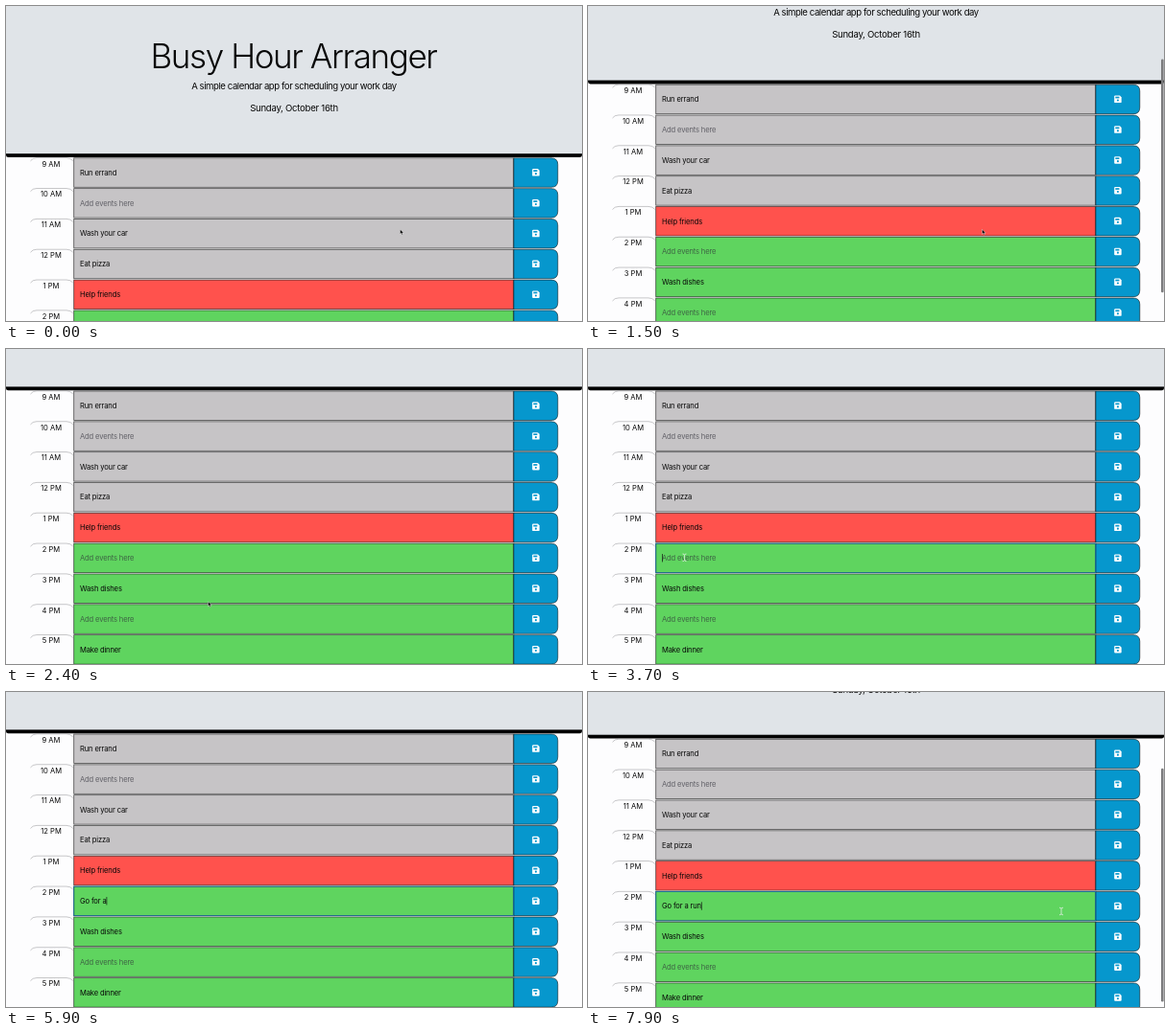
Recreate the animation shown at these times as an HTML page. Size 600 px wide and 329 px high, loop 8000 ms.

```html
<!DOCTYPE html>
<html lang="en">
<head>
<meta charset="utf-8">
<title>Day planner</title>
<style>
  html, body { margin: 0; width: 100%; height: 100%; overflow: hidden; background: #fdfdfe; }
  svg { display: block; width: 600px; height: 329px; }
  text { font: 7.6px Inter, "Open Sans", sans-serif; letter-spacing: -.02em; fill: #080808; white-space: pre; }
  .mid { text-anchor: middle; }
  .title { font-size: 35px; font-weight: 300; letter-spacing: -.04em; }
  .lead { font-size: 9.6px; letter-spacing: -.046em; }
  .date { letter-spacing: -.028em; }
  .hour { letter-spacing: 0; }
  .hint { fill: rgba(45, 45, 55, .66); }
  .edge { stroke: #000; stroke-opacity: .66; stroke-width: .8; }
</style>
</head>
<body>
<svg viewBox="0 0 600 329">
  <g id="page">
    <rect y="-20" width="600" height="178.1" rx="2.4"/>
    <rect y="-20" width="600" height="174.2" fill="#e0e4e8"/>
    <text class="mid title" x="299.5" y="64.5">Busy Hour Arranger</text>
    <text class="mid lead" x="300" y="87">A simple calendar app for scheduling your work day</text>
    <text class="mid lead date" x="300" y="110">Sunday, October 16th</text>
    <g id="rows"></g>
    <rect id="ring" x="70.7" width="458" height="30.5" fill="none" stroke="#1b6f9c" stroke-width=".9"/>
    <rect id="caret" width=".7" height="8.4" fill="#111"/>
  </g>
  <rect id="thumb" x="597" width="2.6" rx="1.3" fill="#7c7c7e"/>
  <path id="arrow" d="M0 0V5L1.2 4 2 5.6 2.9 5.2 2.1 3.7H3.7Z" stroke="#fff" stroke-width=".4"/>
  <path id="beam" d="M-2-3.8Q0-3.8 0-2.4Q0-3.8 2-3.8M0-2.4V2.4M-2 3.8Q0 3.8 0 2.4Q0 3.8 2 3.8" fill="none" stroke="#d5ead6" stroke-width=".9"/>
</svg>
<script>
const LOOP = 8000, STEP = 100;
const TOP = 158.3, PITCH = 31.83, VIEW = 329, PAGE = 444;
const GREY = '#c6c4c6', RED = '#ff524d', GREEN = '#5fd45f', BLUE = '#0697cd';
const HINT = 'Add events here', TYPED = 'Go for a run';
const FIRST_HOUR = 9, NOW = 13, EDITED = 14;
const FOCUS = 3300, TYPE_START = 4800, TYPE_END = 6700, KEY_TIME = 155;

const notes = ['Run errand', '', 'Wash your car', 'Eat pizza', 'Help friends',
  '', 'Wash dishes', '', 'Make dinner'];

const $ = id => document.getElementById(id);

// Smooth 0 to 1 between two times
function ramp(t, from, to) {
  const p = Math.min(1, Math.max(0, (t - from) / (to - from)));
  return p * p * (3 - 2 * p);
}

function scrollAt(t) {
  const back = Math.max(0, (t - 7700) / 200);
  return 116.2 * ramp(t, 880, 1900) - 1.4 * ramp(t, 1900, 2200) - 5.3 * back * back;
}

function pointerAt(t) {
  const drift = ramp(t, 2000, 2400), aim = ramp(t, 2400, 3000), leave = ramp(t, 7300, 7700);
  return [410.5 - 200 * drift - 110 * aim + 392.5 * leave,
          233.3 + 30.5 * drift - 46 * aim + 11.2 * leave];
}

function hourLabel(hour) {
  return `${(hour + 11) % 12 + 1} ${hour < 12 ? 'AM' : 'PM'}`;
}

const saveIcon = `<g transform="translate(548.2 11.8) scale(1.07)">
  <path d="M1 0H5.4L7 1.6V6.2Q7 7 6.2 7H.8Q0 7 0 6.2V.8Q0 0 1 0Z" fill="#fff"/>
  <path d="M1.1 1.1H4.9V2.7H1.1Z" fill="${BLUE}"/><circle cx="3.5" cy="4.7" r="1" fill="${BLUE}"/></g>`;

function row(note, i) {
  const hour = FIRST_HOUR + i;
  const fill = hour < NOW ? GREY : hour > NOW ? GREEN : RED;
  return `<g transform="translate(0 ${TOP + i * PITCH})">
    <path d="M25.5 3.5Q27.5 .4 32 .4H63Q67.5 .4 69.8 3.5" fill="none" stroke="#a2a2a5" stroke-width=".6"/>
    <text class="mid hour" x="47" y="9.3">${hourLabel(hour)}</text>
    <rect class="edge" x="70.7" y=".5" width="458" height="30.5" fill="${fill}"/>
    <path class="edge" d="M528.9 .5H568Q574.8 .5 574.8 7.3V24.2Q574.8 31 568 31H528.9Z" fill="${BLUE}"/>
    <text class="note${note ? '' : ' hint'}" x="77" y="18.5">${note || HINT}</text>
    ${saveIcon}
  </g>`;
}

$('rows').innerHTML = notes.map(row).join('');

const slot = EDITED - FIRST_HOUR;
const field = document.querySelectorAll('.note')[slot];
const fieldTop = TOP + slot * PITCH;
$('ring').setAttribute('y', fieldTop + .5);
$('caret').setAttribute('y', fieldTop + 11.4);
$('thumb').setAttribute('height', VIEW * VIEW / PAGE);

function show(id, amount) {
  $(id).style.opacity = +amount;
}

function move(id, x, y) {
  $(id).setAttribute('transform', `translate(${x} ${y})`);
}

function draw(t) {
  const scroll = scrollAt(t);
  move('page', 0, -scroll);
  move('thumb', 0, scroll * VIEW / PAGE - 1.3);
  show('thumb', ramp(t, 900, 1000) - ramp(t, 2200, 2400) + ramp(t, 7600, 7700));

  const count = Math.max(0, Math.floor((t - TYPE_START) / KEY_TIME) + 1);
  const value = TYPED.slice(0, count);
  field.textContent = value || HINT;
  field.classList.toggle('hint', !value);

  const typing = t >= TYPE_START && t < TYPE_END;
  const blink = (t - TYPE_END + LOOP) % 1000 < 500;
  show('ring', t >= FOCUS);
  show('caret', t >= FOCUS && (typing || blink));
  $('caret').setAttribute('x', 77 + (value ? field.getComputedTextLength() : 0));

  const arrow = t < 2900;
  const pointer = pointerAt(t);
  move('arrow', ...pointer);
  move('beam', ...pointer);
  show('arrow', arrow);
  show('beam', !arrow && (t < TYPE_START || t >= 7300));
}

function tick() {
  draw(Math.floor(performance.now() % LOOP / STEP) * STEP);
  requestAnimationFrame(tick);
}
tick();
</script>
</body>
</html>
```
